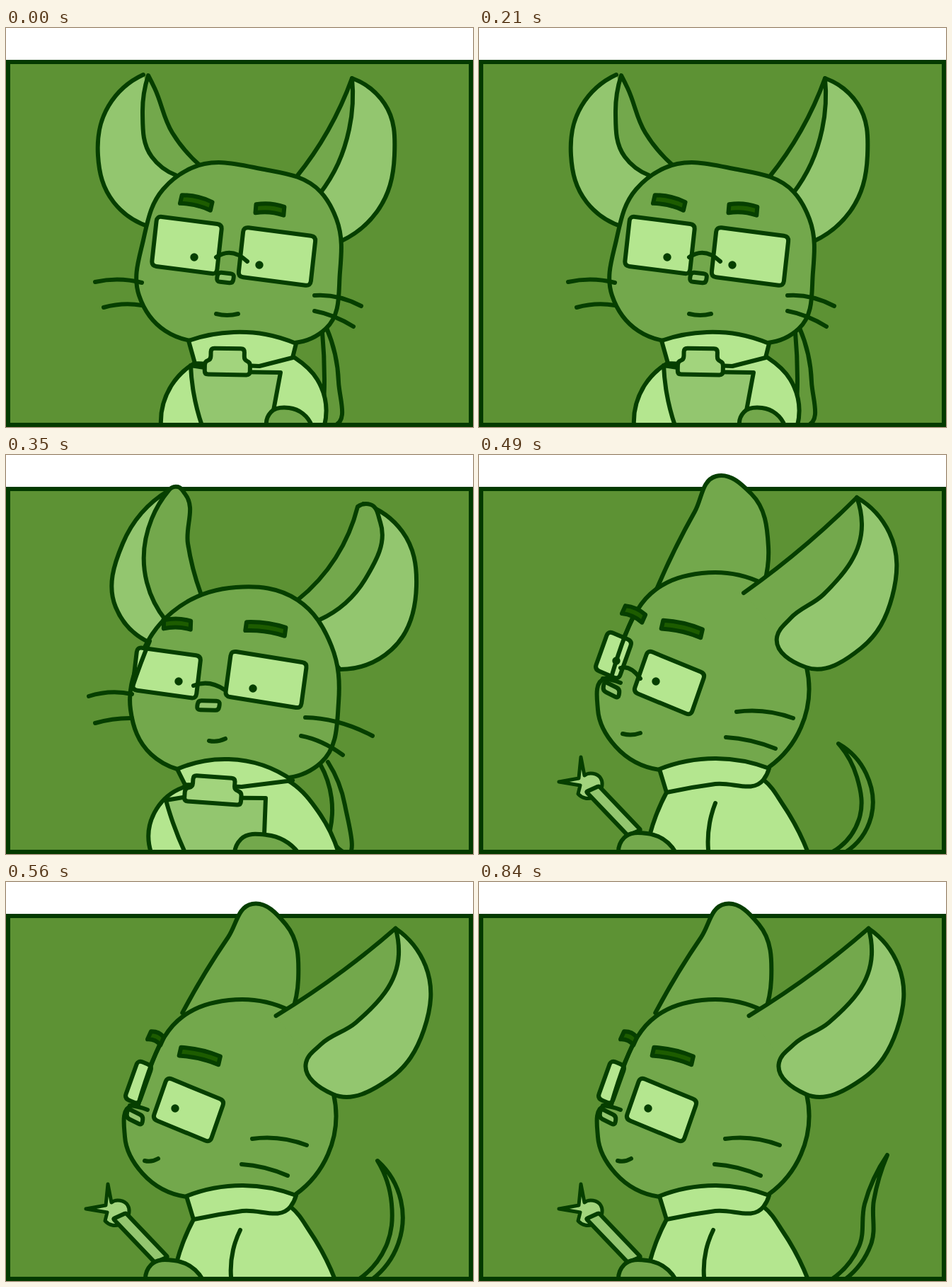
Recreate the animation shown at these times as an HTML page. Size 660x564 px, loop 0.91 s.

```html
<!DOCTYPE html>
<html lang="en">
<head>
<meta charset="utf-8">
<title>Mouse with clipboard</title>
<style>
  html, body { margin: 0; width: 100%; height: 100%; overflow: hidden; background: #fff; }
  svg { display: block; width: 660px; height: 564px; }
  #scene { stroke: #063f00; stroke-width: 6; stroke-linecap: round; stroke-linejoin: round; }
  .line { fill: none; }
  .skin, .flap { fill: #73a84c; }
  .flap { stroke: none; }
  .ear, .board, .nose { fill: #93c66f; }
  .shirt, .lens { fill: #b4e68f; }
  .clip, .hand { fill: #a2d47d; }
  .tail { fill: #64993b; }
  .brow { fill: #1d5c00; }
  .dot { fill: #063f00; stroke: none; }
  .hand { stroke-width: 5; }
</style>
</head>
<body>
<svg viewBox="0 0 660 564">
  <rect x="3" y="48" width="654" height="513" fill="#5d9234" stroke="#043a00" stroke-width="6"/>
  <g id="scene"></g>
  <rect y="558" width="660" height="6" fill="#043a00"/>
</svg>
<script>
const LOOP = 910;
const scene = document.getElementById('scene');

const add = (a, b, k = 1) => [a[0] + b[0] * k, a[1] + b[1] * k];
const between = (a, b) => add(b, a, -1);
const unit = v => add([0, 0], v, 1 / Math.hypot(...v));

// Direction at each point: circle-like inside a run, mirrored about the chord at its ends.
function tangents(pts) {
  const chords = pts.slice(1).map((p, i) => between(pts[i], p));
  const inner = chords.slice(1).map((c, i) => {
    const before = chords[i];
    return unit(add(add([0, 0], unit(before), Math.hypot(...c)), unit(c), Math.hypot(...before)));
  });
  const mirror = (chord, t) => {
    const u = unit(chord);
    return t ? add(add([0, 0], u, 2 * (u[0] * t[0] + u[1] * t[1])), t, -1) : u;
  };
  return [mirror(chords[0], inner[0]), ...inner, mirror(chords.at(-1), inner.at(-1))];
}

// Smooth curve through key points; "/" makes the preceding point a corner.
function curve(kind, text) {
  let d = '', last = null;
  for (const run of text.split('/')) {
    const pts = run.trim().split(/\s+/).map(p => p.split(',').map(Number));
    if (last) pts.unshift(last);
    else d = `M${pts[0]}`;
    last = pts.at(-1);
    if (pts.length < 2) continue;
    const dirs = tangents(pts);
    for (let i = 1; i < pts.length; i++) {
      const a = pts[i - 1], b = pts[i];
      const reach = 0.36 * Math.hypot(...between(a, b));
      d += `C${add(a, dirs[i - 1], reach)} ${add(b, dirs[i], -reach)} ${b}`;
    }
  }
  return `<path class="${kind}" d="${d}"/>`;
}

function rounded(kind, pts, radius) {
  const toward = (a, b) => {
    const side = between(a, b);
    return add(a, side, Math.min(0.5, radius / Math.hypot(...side)));
  };
  const d = pts.map((p, i) =>
    `${i ? 'L' : 'M'}${toward(p, pts.at(i - 1))}Q${p} ${toward(p, pts[(i + 1) % pts.length])}`);
  return `<path class="${kind}" d="${d.join('')}Z"/>`;
}

// Parallelogram around a centre, given its two side vectors.
function box(kind, centre, across, down, radius = 4) {
  const corner = (i, j) => add(add(centre, across, i / 2), down, j / 2);
  return rounded(kind, [corner(-1, -1), corner(1, -1), corner(1, 1), corner(-1, 1)], radius);
}

const turned = (angle, x, y, content) =>
  `<g transform="rotate(${angle} ${x} ${y})">${content}</g>`;

const placed = (x, y, angle, content) =>
  `<g transform="translate(${x} ${y}) rotate(${angle})">${content}</g>`;

const arc = (x1, y1, x2, y2, rise) =>
  `<path class="line" d="M${x1} ${y1}Q${(x1 + x2) / 2} ${(y1 + y2) / 2 - 2 * rise} ${x2} ${y2}"/>`;

const dot = (x, y) => `<circle class="dot" cx="${x}" cy="${y}" r="5.7"/>`;

const brow = (x, y, w, angle) => placed(x, y, angle,
  `<path class="brow" d="M${-w / 2} -5Q0 -10 ${w / 2} -5V7Q0 2 ${-w / 2} 7Z"/>`);

const lens = (x, y, w, h, slope) =>
  box('lens', [x, y], [w, w * slope], [-0.85 * h * slope, h], 7);

const nose = (x, y, w, slope) => box('nose', [x, y], [w, w * slope], [-2, 13], 5);

const clip = (x, y, w, angle) => {
  const right = [[0.37 * w, -19], [0.37 * w, -3], [w / 2, 0], [w / 2, 18]];
  const left = right.map(([px, py]) => [-px, py]).reverse();
  return placed(x, y, angle, rounded('clip', [...right, ...left], 5));
};

const paw = (x, w, top) =>
  curve('skin', `${x},562 ${x + 0.1 * w},${top + 8} ${x + 0.5 * w},${top + 2} ${x + w},562`);

const front = eyes => [
  curve('tail', '447,430 450,500 447,562 / 463,562 470,500 453,424'),
  curve('ear', '194,66 145,110 130,180 152,246 203,281 / 250,230'),
  curve('skin', '240,208 206,182 193,120 201,67 / 210,85 235,148 275,195'),
  curve('ear', '489,71 535,107 549,180 524,260 474,301 / 430,250'),
  curve('skin', '410,211 455,145 489,71 / 485,143 443,235'),
  curve('skin', '408,445 452,425 472,345 467,270 445,232 360,199 262,198 222,228 194,300 188,378 225,428 262,442'),
  brow(269, 246, 44, 13), brow(373, 256, 40, 5),
  lens(255.5, 307, 92, 70, 0.13), lens(383, 323, 102, 70, 0.13),
  eyes,
  arc(297, 324, 341, 330, 9), nose(310, 353, 23, 0.1), arc(297, 404, 328, 404, -2),
  arc(126, 359, 192, 360, 4), arc(138, 395, 192, 392, 3),
  arc(436, 378, 502, 393, 5), arc(436, 400, 491, 422, 3),
  curve('shirt', '219,562 234,505 266,474 / 408,466 440,497 450,562'),
  curve('shirt', '258,442 322,430 410,446 / 405,466 / 358,478 / 267,474 / 258,442'),
  curve('board', '277,562 265,515 261,477 / 320,486 / 388,487 / 374,562'),
  clip(313, 472, 64, 1), paw(368, 64, 535)
];

const turning = () => [
  curve('tail', '444,437 460,485 458,530 / 478,562 479,495 455,434'),
  curve('ear', '230,50 165,125 155,215 205,266 / 240,240'),
  curve('skin', '226,234 199,180 206,90 230,50 / 243,45 253,55 257,125 275,195'),
  curve('ear', '505,69 560,108 580,185 545,275 472,303 / 430,250'),
  curve('skin', '412,205 466,145 497,73 / 515,70 529,95 508,175 443,233'),
  brow(242, 239, 40, 2), brow(367, 245, 56, 8),
  curve('skin', '400,456 445,435 470,350 460,270 412,205 325,187 235,222 188,290 176,360 205,423 242,444'),
  brow(242, 239, 38, 2), brow(367, 245, 56, 8),
  lens(227, 308, 90, 60, 0.14), lens(367.5, 317.5, 107, 64, 0.16),
  arc(203, 263, 178, 330, 2), dot(244, 320), dot(349, 330),
  arc(265, 326, 309, 332, 6), nose(286, 354, 31, 0.03), arc(287, 404, 310, 401, -2),
  arc(117, 341, 178, 338, 4), arc(126, 379, 178, 372, 2),
  arc(423, 371, 518, 397, 6), arc(417, 397, 476, 424, 4),
  curve('shirt', '205,562 213,500 250,470 / 403,463 442,505 470,562'),
  curve('shirt', '242,444 315,430 405,460 / 333,469 / 253,466 / 242,444'),
  curve('board', '253,562 236,520 226,488 / 250,484 / 367,485 / 364,562'),
  clip(293, 474, 80, 4), paw(323, 90, 535)
];

const threeQuarter = () => [
  curve('tail', '478,562 508,500 490,450 447,420 / 520,444 543,505 513,562'),
  curve('skin', '249,207 262,115 268,65 295,55 347,105 355,177'),
  curve('ear', '514,63 550,95 560,200 520,287 467,306 / 430,230'),
  curve('skin', '392,186 460,122 514,63 / 480,145 423,208'),
  curve('skin', '400,454 442,426 468,330 452,250 395,188 300,185 215,240 175,330 190,405 267,456'),
  brow(232, 240, 19, 8), brow(347, 245, 57, 7),
  lens(207.5, 301, 77, 66, 0.18), lens(337.5, 320, 106, 67, 0.16),
  arc(213, 243, 174, 332, 4), dot(220, 315), dot(322, 329),
  arc(234, 318, 285, 326, 8), nose(250, 346, 26, 0.08), arc(242, 401, 272, 396, -2),
  arc(384, 376, 474, 382, 4), arc(380, 408, 442, 434, 4),
  curve('shirt', '290,562 / 280,489 / 396,475 428,515 453,562'),
  curve('shirt', '267,456 345,441 400,450 / 396,475 335,473 280,489 / 267,476 / 267,456'),
  curve('line', '376,520 373,540 374,558'),
  curve('board', '234,562 / 206,478 / 294,508 / 288,562'),
  clip(250, 479, 50, 20), paw(269, 62, 525)
];

// turn swings the ears back and slides the face away; the tail follows its tip.
const profile = (turn, tipX, tipY) => {
  const slide = 11 * turn;
  const bend = 534 + 11 * turn;
  return [
    curve('tail', `498,562 537,515 ${bend},455 ${tipX},${tipY} / ${bend + 13},450 554,512 517,562`),
    turned(5 * turn, 330, 180, curve('skin', '250,192 305,80 335,30 385,55 409,130 404,178')),
    curve('skin', '410,441 455,385 463,300 / 450,225 / 400,181 / 315,167 250,190 204,260 187,315 / 178,316 168,360 193,412 255,445'),
    turned(4 * turn, 462, 300,
      curve('flap', '374,195 465,124 534,60 / 541,97 487,197 440,231 / 421,250') +
      curve('ear', '534,60 580,110 584,200 540,273 462,300 421,258 440,231 487,197 541,97 534,60') +
      curve('line', '374,195 465,124 534,60')),
    lens(190 - 3 * turn, 283, 34 - 14 * turn, 54, 0.42), lens(269 - slide, 322, 81, 59, 0.41),
    arc(218, 228, 187, 314, 5),
    brow(219 - 7 * turn, 224 - 4 * turn, 31 - 11 * turn, 24), brow(287 - 13 * turn, 245, 57, 13),
    turn ? '' : dot(194, 291) + arc(200, 301, 228, 316, 6),
    dot(250 - slide, 320), arc(175, 316, 200, 322, 1), nose(187 - 5 * turn, 332, 22, 0.5),
    arc(203 - 7 * turn, 394, 228 - 13 * turn, 393 - 2 * turn, -2),
    arc(364 - 16 * turn, 363, 444 - 19 * turn, 372, 5), arc(349 - 16 * turn, 399, 419 - 21 * turn, 415, 3),
    curve('shirt', '236,562 250,510 265,477 / 402,459 430,495 465,562'),
    curve('shirt', '255,444 335,429 410,443 / 402,459 334,465 265,477 / 255,444'),
    curve('line', `${334 - 3 * turn},492 ${326 - 5 * turn},520 ${324 - 6 * turn},558`),
    curve('hand', '113,462 / 141,457 / 144,427 / 149,453 / 172,457 174,467 / 150,485 140,479 / 143,467 / 113,462'),
    box('board', [190, 503], [18, -8], [59, 62], 2),
    paw(197, 81, 533)
  ];
};

const openEyes = dot(266, 324) + dot(358, 335);
const closedEyes = arc(251, 322, 281, 325, -1) + arc(345, 334, 371, 337, -1);

const poses = [
  [0, front(openEyes)],
  [70, front(closedEyes)],
  [210, front(openEyes)],
  [350, turning()],
  [420, threeQuarter()],
  [490, profile(0, 508, 408)],
  [560, profile(1, 525, 394)],
  [630, profile(1, 552, 388)],
  [700, profile(1, 577, 386)]
].map(([start, parts]) => ({ start, markup: parts.join('') }));

let shown = null;
function update(now) {
  const t = now % LOOP;
  const pose = poses.findLast(p => p.start <= t);
  if (pose !== shown) {
    scene.innerHTML = pose.markup;
    shown = pose;
  }
  requestAnimationFrame(update);
}
update(0);
</script>
</body>
</html>
```
